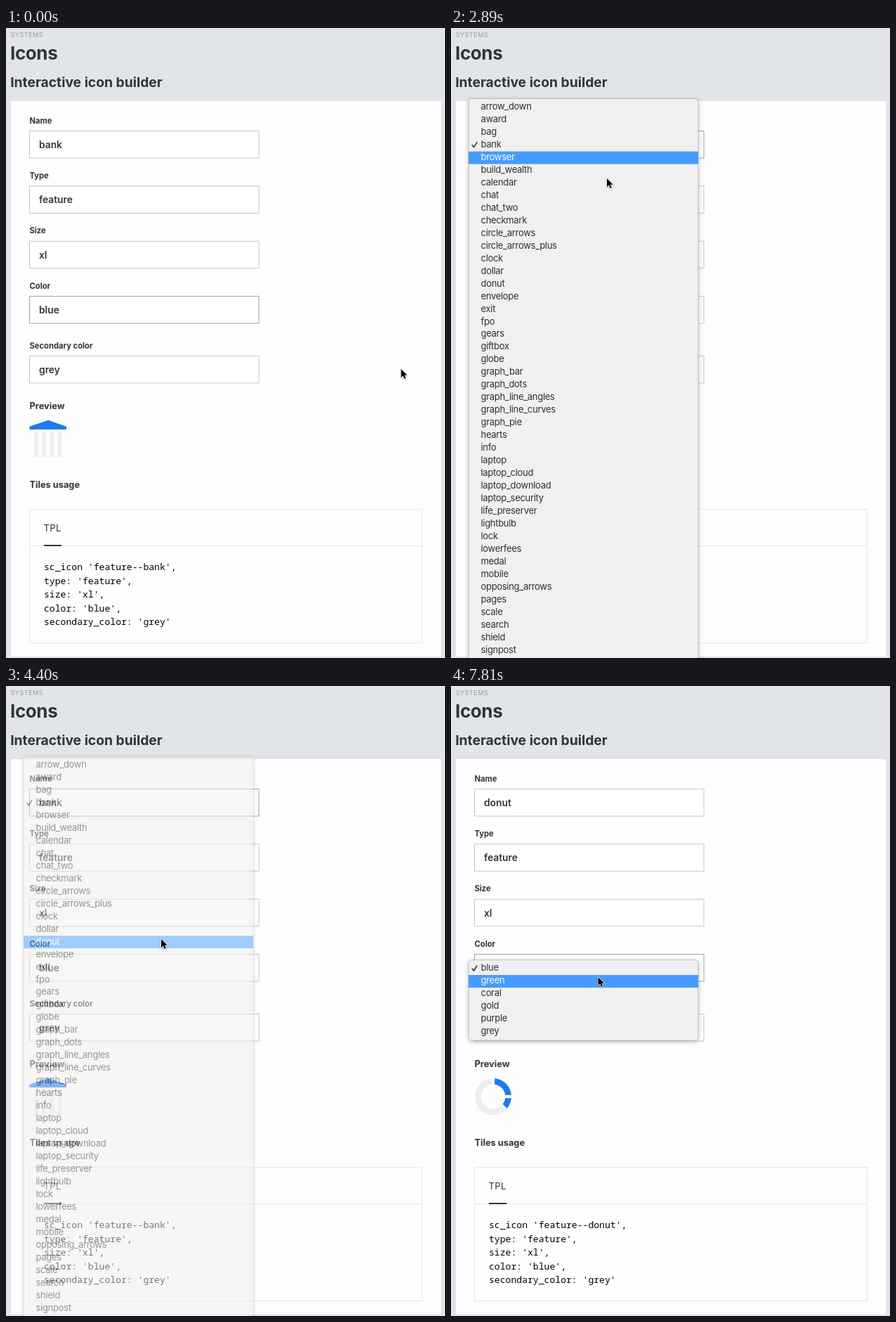
Recreate the animation shown at these times as an HTML page. Size 625 by 896 pixels, loop 8000 ms.

```html
<!DOCTYPE html>
<html lang="en">
<head>
<meta charset="utf-8">
<title>Icon builder</title>
<style>
  html, body { margin: 0; width: 100%; height: 100%; overflow: hidden; background: #e1e4e9; }
  svg { display: block; width: 100vw; height: 100vh; font-family: Inter, "Liberation Sans", sans-serif; font-optical-sizing: none; }
  text { white-space: pre; fill: #2f353d; }
  .crumb { font-size: 9.3px; letter-spacing: .35px; fill: #999da3; }
  .h1 { font-size: 26px; font-weight: 700; letter-spacing: -.4px; }
  .h2 { font-size: 19.3px; font-weight: 700; }
  .label { font-size: 11.2px; font-weight: 700; }
  .value { font-size: 13.8px; font-weight: 600; }
  .head { font-size: 12.8px; font-weight: 700; }
  .tab { font-size: 13.2px; letter-spacing: .3px; }
  .code { font: 500 13.1px "Noto Sans Mono", "DejaVu Sans Mono", monospace; fill: #000; }
  .item { font-size: 13px; letter-spacing: -.3px; fill: #303030; }
  .item.on { fill: #fff; }
  .box { fill: #fff; stroke: #c4c7ca; }
  .box.focus { stroke: #a0a2a5; }
  .rule { fill: none; stroke: #e5e6e8; }
  .panel { fill: #f0f0f0; stroke: #b4b4b4; stroke-width: .8; }
  .menu { filter: drop-shadow(0 2px 3.5px rgba(0, 0, 0, .22)); }
  .tick { fill: none; stroke: #303030; stroke-width: 1.5; stroke-linecap: round; stroke-linejoin: round; }
  .tick.on { stroke: #fff; }
  .cursor { filter: drop-shadow(0 1px 1px rgba(0, 0, 0, .3)); }
</style>
</head>
<body>
<svg id="stage" viewBox="0 0 625 896" preserveAspectRatio="none"></svg>
<script>
const LOOP = 8000;
const BLUE = '#2079ee';
const GREY = '#eeeeee';
const stage = document.getElementById('stage');

const names = ('arrow_down award bag bank browser build_wealth calendar chat chat_two checkmark ' +
  'circle_arrows circle_arrows_plus clock dollar donut envelope exit fpo gears giftbox globe ' +
  'graph_bar graph_dots graph_line_angles graph_line_curves graph_pie hearts info laptop ' +
  'laptop_cloud laptop_download laptop_security life_preserver lightbulb lock lowerfees medal ' +
  'mobile opposing_arrows pages scale search shield signpost').split(' ');
const colors = 'blue green coral gold purple grey'.split(' ');

const fields = [
  ['Name', 'bank', 146.5],
  ['Type', 'feature', 224.8],
  ['Size', 'xl', 303.2],
  ['Color', 'blue', 381.5],
  ['Secondary color', 'grey', 466.5]
];

const text = (cls, x, y, str, id = '') =>
  `<text class="${cls}" x="${x}" y="${y}"${id && ` id="${id}"`}>${str}</text>`;
const rect = (x, y, w, h, attrs) =>
  `<rect x="${x}" y="${y}" width="${w}" height="${h}" ${attrs}/>`;

function field([label, value, y], i) {
  return text('label', 33.5, y - 10.8, label) +
    rect(33.5, y, 326.5, 38.5, `class="box" id="box${i}"`) +
    text('value', 47, y + 24.6, value, 'value' + i);
}

// Point on a circle, with the angle in degrees clockwise from the top.
function polar(r, deg) {
  const a = deg * Math.PI / 180;
  return `${60 + r * Math.sin(a)} ${584 - r * Math.cos(a)}`;
}

function arc(from, to, color) {
  const large = to - from > 180 ? 1 : 0;
  return `<path d="M${polar(21.7, from)}A21.7 21.7 0 ${large} 1 ${polar(21.7, to)}" ` +
    `fill="none" stroke="${color}" stroke-width="8.6"/>`;
}

function bankIcon() {
  const columns = [0, 1, 2, 3].map(i => rect(40 + i * 11, 575.3, 6.5, 34.7, `fill="${GREY}"`));
  return `<g id="bank"><path d="M33.5 571v-4.3L60 557.8l26 8.9v4.3z" fill="${BLUE}"/>${columns.join('')}</g>`;
}

function donutIcon() {
  const gaps = [0, 90, 135].map(a =>
    `<path d="M${polar(15, a)}L${polar(28, a)}" stroke="#fff" stroke-width="4.2"/>`);
  return '<g id="donut">' + arc(0, 135, BLUE) + arc(135, 360, GREY) + gaps.join('') + '</g>';
}

function menu(id, items, top, height, first, step, checked) {
  const rows = items.map((s, i) => text('item', 42.5, first + i * step + 12.4, s)).join('');
  const y = first + checked * step + 9;
  return `<g id="${id}" class="menu">` +
    rect(25, top, 327, height, 'rx="4.5" class="panel"') +
    rect(25, 0, 327, step, 'fill="#479bfe" class="bar"') + rows +
    `<path class="tick" d="M30.2 ${y}l2.3 3 4.3-7"/></g>`;
}

stage.innerHTML =
  rect(0, 0, 625, 896, 'fill="#e1e4e9"') +
  rect(7, 104, 612, 790, 'fill="#fefefe"') +
  text('crumb', 6.5, 13, 'SYSTEMS') +
  text('h1', 6, 45.3, 'Icons') +
  text('h2', 6.2, 84.2, 'Interactive icon builder') +
  fields.map(field).join('') +
  text('head', 33.5, 541.6, 'Preview') +
  bankIcon() + donutIcon() +
  text('head', 33.5, 654.3, 'Tiles usage') +
  rect(33.5, 684.5, 559, 190, 'class="rule"') +
  '<path class="rule" d="M33.5 736.5h559"/>' +
  rect(54, 735, 25, 2, 'fill="#2f353d"') +
  text('tab', 53.5, 715.7, 'TPL') +
  ['', "type: 'feature',", "size: 'xl',", "color: 'blue',", "secondary_color: 'grey'"]
    .map((s, i) => text('code', 54, 771 + i * 19.6, s, 'code' + i)).join('') +
  menu('nameMenu', names, 100.5, 830, 103.7, 17.965, 3) +
  menu('colorMenu', colors, 389.5, 114.5, 393, 18, 0) +
  '<path id="cursor" class="cursor" d="M0 0V12L2.8 9.4 4.7 13.8 6.7 13 4.8 8.7H8.6Z" ' +
  'stroke="#fff" stroke-width="1.4" paint-order="stroke" stroke-linejoin="round"/>';

const el = id => document.getElementById(id);
const show = (node, on) => node.setAttribute('display', on ? 'inline' : 'none');

// The pointer holds each position until the next step.
const glide = [960, 1070, 1180, 1300, 1410, 1520].map((t, i) => {
  const p = 1 - (1 - (i + 1) / 6) ** 2;
  return [t, 298 - 72.5 * p, 283.5 - 109 * p];
});
const moves = [
  [0, 562.5, 485], [570, 488, 435.5], [780, 298, 283.5], ...glide,
  [2740, 225, 174],
  [2890, 222, 214], [3000, 221, 248], [3120, 220, 283], [3240, 219.5, 317],
  [3360, 219.5, 341], [3480, 220.5, 354], [3600, 221, 360],
  [5880, 216, 373], [6000, 212, 387], [6110, 209, 395], [6200, 208.3, 398],
  [7490, 208.3, 401], [7600, 209, 406], [7710, 209.3, 411], [7810, 209.5, 414]
];
const nameRow = [
  [0, 3], [2890, 4], [3000, 6], [3120, 8], [3240, 10], [3360, 12], [3480, 13],
  [3600, 14], [4190, -1], [4300, 14]
];
const colorRow = [[0, 0], [7710, 1]];
const fade = [[0, 0], [1730, 1], [4400, .5], [4510, 0]];
const focus = [[0, 3], [1730, 0], [6680, 3]];

function at(keys, t) {
  let k = keys[0];
  for (const key of keys) if (key[0] <= t) k = key;
  return k;
}

function select(id, row, first, step, checked) {
  const g = el(id);
  const bar = g.querySelector('.bar');
  show(bar, row >= 0);
  bar.setAttribute('y', first + row * step);
  g.querySelectorAll('.item').forEach((n, i) => n.classList.toggle('on', i === row));
  g.querySelector('.tick').classList.toggle('on', row === checked);
}

function draw(t) {
  const [, x, y] = at(moves, t);
  el('cursor').setAttribute('transform', `translate(${x} ${y})`);

  const alpha = at(fade, t)[1];
  show(el('nameMenu'), alpha > 0);
  el('nameMenu').setAttribute('opacity', alpha);
  select('nameMenu', at(nameRow, t)[1], 103.7, 17.965, 3);

  show(el('colorMenu'), t >= 6680);
  select('colorMenu', at(colorRow, t)[1], 393, 18, 0);

  const active = at(focus, t)[1];
  fields.forEach((f, i) => el('box' + i).classList.toggle('focus', i === active));

  const updated = t >= 4930;
  el('value0').textContent = t >= 4510 ? 'donut' : 'bank';
  el('code0').textContent = `sc_icon 'feature--${updated ? 'donut' : 'bank'}',`;
  show(el('bank'), !updated);
  show(el('donut'), updated);
}

const start = performance.now();
function tick() {
  draw((performance.now() - start) % LOOP);
  requestAnimationFrame(tick);
}
tick();
</script>
</body>
</html>
```
